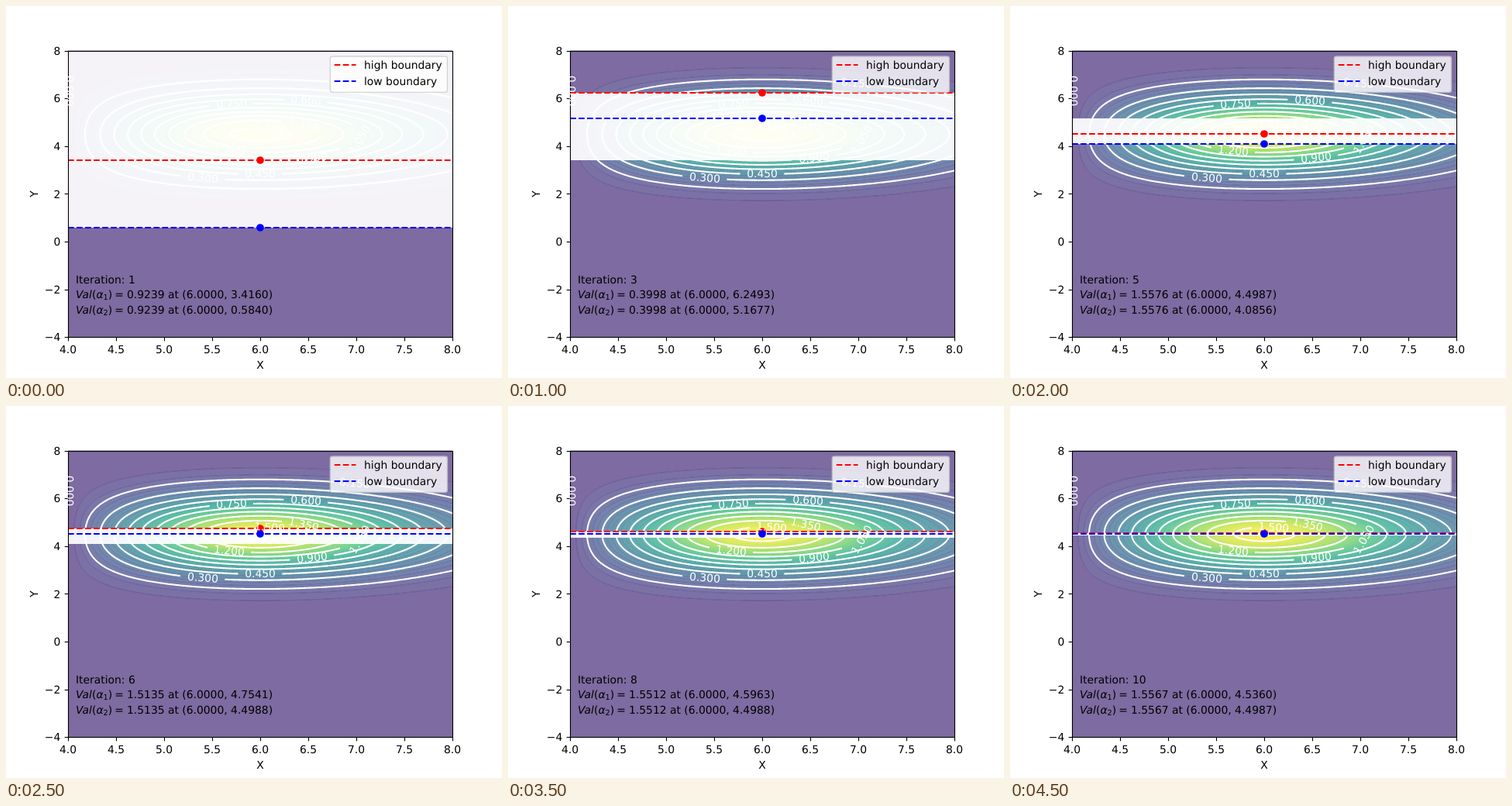
An HTML page for the animation above (5 s loop, 640x480 px).

```html
<!DOCTYPE html>
<html lang="en">
<head>
<meta charset="utf-8">
<title>Golden section search</title>
<style>
html, body { margin: 0; width: 100%; height: 100%; overflow: hidden; background: #fff; }
svg { display: block; width: 640px; height: 480px; }
text { font: 13.89px "DejaVu Sans", sans-serif; text-rendering: geometricPrecision; white-space: pre; }
.mid { text-anchor: middle; }
.end { text-anchor: end; }
.it { font-style: italic; }
.sub { font-size: 9.72px; }
.dash { stroke-width: 2.08; stroke-dasharray: 7.708 3.333; fill: none; }
.axis { stroke: #000; stroke-width: 1.11; fill: none; }
.iso { stroke: #fff; stroke-width: 2.08; fill: none; stroke-linejoin: round; }
.high { stroke: red; }
.low { stroke: blue; }
</style>
</head>
<body>
<svg viewBox="0 0 640 480">
  <clipPath id="area"><rect x="80" y="57.6" width="496" height="369.6"/></clipPath>
  <g clip-path="url(#area)">
    <g id="bands"></g>
    <rect id="span" x="80" width="496" fill="#fff" fill-opacity=".92"/>
    <g id="isolines"></g>
    <path id="highLine" class="dash high"/>
    <path id="lowLine" class="dash low"/>
    <circle id="highDot" cx="328" r="4.86" fill="red"/>
    <circle id="lowDot" cx="328" r="4.86" fill="blue"/>
  </g>
  <g id="axes"><rect class="axis" x="80.5" y="58.5" width="496" height="369"/></g>
  <g id="labels" fill="#fff"></g>
  <text id="count" x="90" y="358"></text>
  <g id="values"></g>
  <g>
    <rect x="418.3" y="65" width="151.2" height="46.4" rx="2.8" fill="#fff" stroke="#ccc" stroke-width="1.39" opacity=".8"/>
    <path class="dash high" d="M423.7 76h27.8"/>
    <path class="dash low" d="M423.7 97h27.8"/>
    <text x="462" y="81">high boundary</text>
    <text x="462" y="102">low boundary</text>
  </g>
</svg>
<script>
const $ = id => document.getElementById(id);
const px = x => 80 + (x - 4) * 124;
const py = y => 427.2 - (y + 4) * 30.8;
const profile = x => (x - 4) * Math.exp(-(((x - 5) / 2) ** 2));
const value = y => profile(6) * Math.exp(-(((y - 4.5) / 1.5) ** 2));
// vertical half-size of a level curve at x
const reach = (x, level) => 1.5 * Math.sqrt(Math.max(0, Math.log(profile(x) / level)));

function add(parent, tag, attrs, text) {
  const el = document.createElementNS('http://www.w3.org/2000/svg', tag);
  for (const k in attrs) el.setAttribute(k, attrs[k]);
  if (text !== undefined) el.textContent = text;
  $(parent).appendChild(el);
  return el;
}

const ramp = ['440154', '482878', '3e4989', '31688e', '26828e', '1f9e89', '35b779', '6ece58', 'b5de2b', 'fde725']
  .map(h => [0, 2, 4].map(i => parseInt(h.slice(i, i + 2), 16)));
function color(t) {
  const p = Math.min(1, Math.max(0, t)) * 9, i = Math.min(8, Math.floor(p));
  return `rgb(${ramp[i].map((c, k) => Math.round(c + (ramp[i + 1][k] - c) * (p - i)))})`;
}

function crossing(inside, outside, level) {
  for (let i = 0; i < 50; i++) {
    const m = (inside + outside) / 2;
    if (profile(m) > level) inside = m; else outside = m;
  }
  return inside;
}

// closed level curve, starting and ending at its left tip
function curve(level, n = 400) {
  const l = crossing(6, 4, level), r = crossing(6, 11, level), pts = [];
  for (let i = 0; i <= n; i++) {
    const a = Math.PI * (1 + 2 * i / n);
    const x = (l + r) / 2 + (r - l) / 2 * Math.cos(a);
    pts.push([px(x), py(4.5 + Math.sign(Math.sin(a)) * (i % n ? reach(x, level) : 0))]);
  }
  return pts;
}
const toPath = pts => 'M' + pts.map(p => p[0].toFixed(2) + ' ' + p[1].toFixed(2)).join('L');

// filled bands; neighbours overlap in a thin darker seam
const frame = 'M80 57H576V428H80Z', step = 0.05;
let outer = frame;
for (let k = 0; k <= 31; k++) {
  const fill = color((k * step + 0.225) / 1.775);
  const inner = k < 31 ? toPath(curve((k + 1) * step)) + 'Z' : '';
  add('bands', 'path', { d: outer + inner, fill, 'fill-opacity': 0.7, 'fill-rule': 'evenodd' });
  if (k) add('bands', 'path', { d: outer, fill: 'none', stroke: fill, 'stroke-width': 0.7, 'stroke-opacity': 0.7 });
  outer = inner;
}

function label(text, x, y, angle) {
  add('labels', 'text', { class: 'mid', y: 4.3, transform: `translate(${x} ${y}) rotate(${angle})` }, text);
}

// level, label x, side (1 upper, -1 lower), optional angle
const marks = [[0.15, 450, 1], [0.3, 254, -1], [0.45, 328, -1], [0.6, 387, 1], [0.75, 291, 1],
  [0.9, 395, -1], [1.05, 457, -1, -60], [1.2, 288, -1], [1.35, 384, 1], [1.5, 340, 1]];
for (const [level, cx, side, fixed] of marks) {
  const at = x => py(4.5 + side * reach(4 + (x - 80) / 124, level));
  const cy = at(cx);
  const angle = fixed ?? Math.atan2(at(cx + 3) - at(cx - 3), 6) * 180 / Math.PI;
  const pts = curve(level, 800), arc = [0];
  let near = 0, best = Infinity;
  pts.forEach((p, i) => {
    if (i) arc.push(arc[i - 1] + Math.hypot(p[0] - pts[i - 1][0], p[1] - pts[i - 1][1]));
    const d = Math.hypot(p[0] - cx, p[1] - cy);
    if (d < best) { best = d; near = i; }
  });
  const before = pts.filter((p, i) => arc[i] < arc[near] - 28);
  const after = pts.filter((p, i) => arc[i] > arc[near] + 28);
  add('isolines', 'path', { class: 'iso', d: toPath(after.concat(before)) });
  label(level.toFixed(3), cx, cy, angle);
}
label('0.000', 81.5, 109.5, 90);

const snap = v => Math.floor(v + 0.5) + 0.5;
for (let i = 0; i <= 8; i++) {
  const x = 80 + 62 * i;
  add('axes', 'path', { class: 'axis', d: `M${x + 0.5} 427.5v4.86` });
  add('axes', 'text', { class: 'mid', x, y: 448 }, (4 + i / 2).toFixed(1));
}
for (let v = -4; v <= 8; v += 2) {
  const y = py(v);
  add('axes', 'path', { class: 'axis', d: `M80.5 ${snap(y)}h-4.86` });
  add('axes', 'text', { class: 'end', x: 70.3, y: y + 5.1 }, String(v).replace('-', '\u2212'));
}
add('axes', 'text', { class: 'mid', x: 328, y: 467.5 }, 'X');
add('axes', 'text', { class: 'mid', transform: 'translate(40.5 242.4) rotate(-90)' }, 'Y');

const readouts = [376.5, 397].map((y, i) => {
  const t = add('values', 'text', { x: 90, y });
  t.innerHTML = `<tspan class="it">Val</tspan>(<tspan class="it">α</tspan><tspan class="sub" dy="2.2">${i + 1}</tspan>` +
    '<tspan dy="-2.2">)</tspan><tspan dx="3.2">=</tspan>';
  return add('values', 'text', { x: 156, y });
});

// golden section search for the maximum along x = 6
const steps = [];
for (let i = 0, a = -4, b = 8; i < 10; i++) {
  const high = a + 0.618 * (b - a), low = a + 0.382 * (b - a);
  if (value(high) > value(low)) a = low; else b = high;
  steps.push({ high, low, a, b });
}

let shown = -1;
function show(i) {
  const s = steps[i];
  const top = Math.round(py(s.b)), bottom = Math.round(py(s.a));
  $('span').setAttribute('y', top);
  $('span').setAttribute('height', bottom - top);
  ['high', 'low'].forEach((name, k) => {
    const y = Math.round(py(s[name]));
    $(name + 'Line').setAttribute('d', `M80 ${y}H576`);
    $(name + 'Dot').setAttribute('cy', y);
    readouts[k].textContent = `${value(s.high).toFixed(4)} at (6.0000, ${s[name].toFixed(4)})`;
  });
  $('count').textContent = `Iteration: ${i + 1}`;
}

const start = performance.now();
function tick() {
  const i = Math.floor(Math.max(0, performance.now() - start) / 500) % steps.length;
  if (i !== shown) show(shown = i);
  requestAnimationFrame(tick);
}
tick();
</script>
</body>
</html>
```
